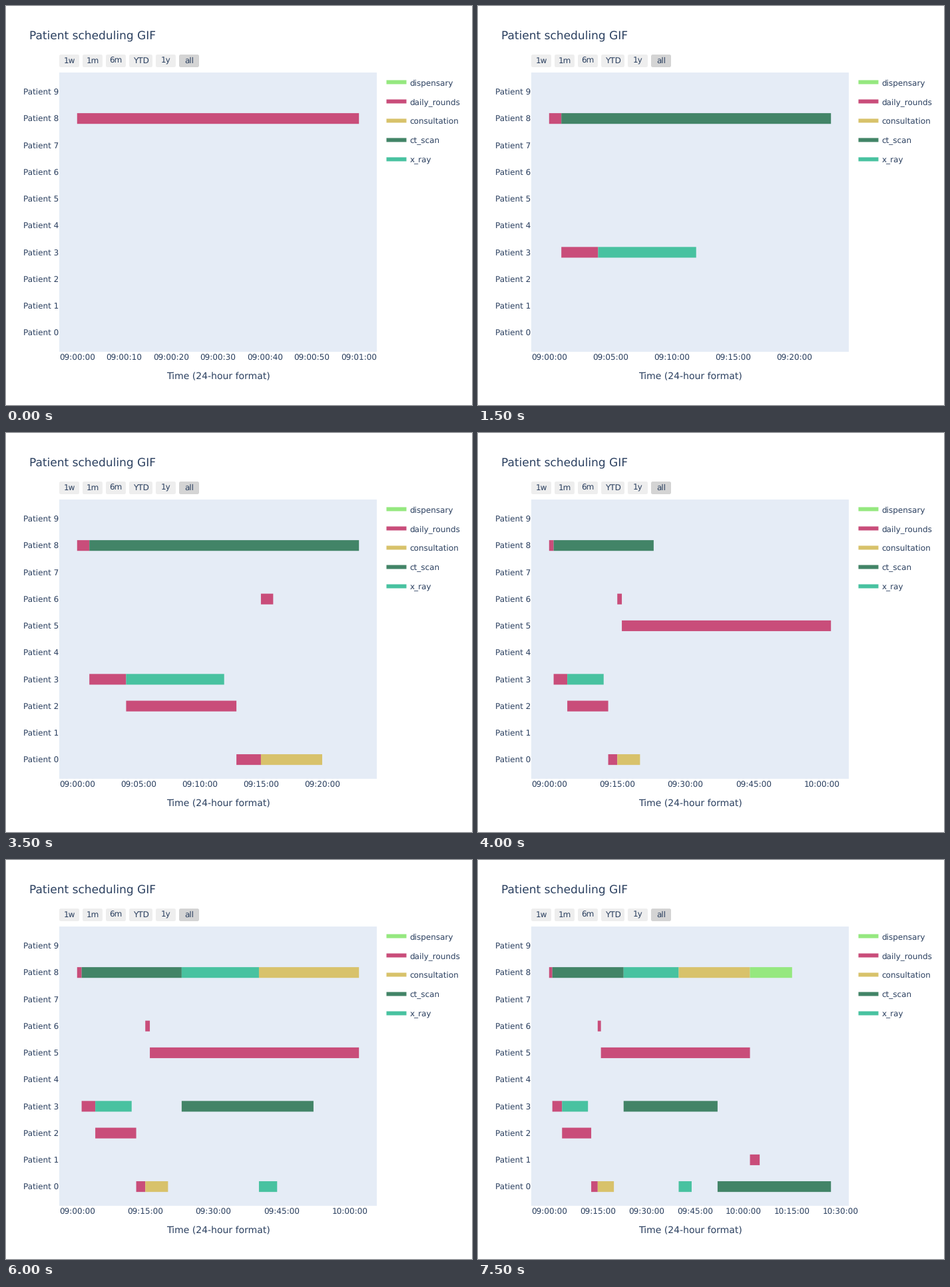
Animation of 700 by 600 pixels, one loop 8000 ms. Source, as a matplotlib script:

```python
import matplotlib.pyplot as plt
from matplotlib.animation import FuncAnimation
from matplotlib.patches import FancyBboxPatch, Rectangle

plt.rcParams.update({
    "font.family": "DejaVu Sans",
    "text.hinting": "none",
    "toolbar": "None",
})

W, H, DPI = 700, 600, 100
INK = "#2a3f5f"
LEFT, RIGHT, TOP, BOTTOM = 80, 557, 100, 520
X0, X1 = 106.8, 530.2          # pixel span of the scheduled time
Y0, ROW = 491.1, 40.24         # centre of the lowest row, row spacing

COLORS = {
    "dispensary": "#95e87f",
    "daily_rounds": "#c94d7a",
    "consultation": "#d8c26b",
    "ct_scan": "#428467",
    "x_ray": "#48c2a0",
}

# (patient, activity, start minute, end minute), one added per step
TASKS = [
    (8, "daily_rounds", 0, 1),
    (8, "ct_scan", 1, 23),
    (3, "daily_rounds", 1, 4),
    (3, "x_ray", 4, 12),
    (2, "daily_rounds", 4, 13),
    (0, "daily_rounds", 13, 15),
    (0, "consultation", 15, 20),
    (6, "daily_rounds", 15, 16),
    (5, "daily_rounds", 16, 62),
    (8, "x_ray", 23, 40),
    (3, "ct_scan", 23, 52),
    (0, "x_ray", 40, 44),
    (8, "consultation", 40, 62),
    (0, "ct_scan", 52, 87),
    (8, "dispensary", 62, 75),
    (1, "daily_rounds", 62, 65),
]

fig = plt.figure(figsize=(W / DPI, H / DPI), dpi=DPI, facecolor="white")
ax = fig.add_axes([0, 0, 1, 1])
ax.set_xlim(0, W)
ax.set_ylim(H, 0)
ax.axis("off")


def label(x, y, text, px=12, ha="left"):
    return ax.text(x, y, text, fontsize=px * 72 / DPI, color=INK,
                   ha=ha, va="baseline")


def box(x, y, w, h, color, z=1):
    return ax.add_patch(Rectangle((x, y), w, h, facecolor=color,
                                  linewidth=0, snap=False, zorder=z))


def row_y(patient):
    return Y0 - ROW * patient


def draw_static():
    label(35, 50, "Patient scheduling GIF", 17)
    label((LEFT + RIGHT) / 2, 561, "Time (24-hour format)", 14, "center")
    box(LEFT, TOP, RIGHT - LEFT, BOTTOM - TOP, "#e5ecf6", 0)

    x = LEFT
    for name in ("1w", "1m", "6m", "YTD", "1y", "all"):
        w = 35 if name == "YTD" else 30
        ax.add_patch(FancyBboxPatch(
            (x, 73), w, 19, boxstyle="round,pad=0,rounding_size=2.5",
            facecolor="#d4d4d4" if name == "all" else "#eeeeee", linewidth=0))
        label(x + w / 2, 86, name, ha="center")
        x += w + 5

    for p in range(10):
        label(79, round(row_y(p) + 4.2), f"Patient {p}", ha="right")

    for i, (name, color) in enumerate(COLORS.items()):
        y = 114.5 + 29 * i
        box(571.5, y - 3, 30, 6, color)
        label(606.5, round(y + 4.6), name)


def tick_step(span):
    """Tick distance in seconds for a span in minutes."""
    return 10 if span <= 1 else 300 if span <= 30 else 900


def clock(sec):
    return f"{9 + sec // 3600:02d}:{sec // 60 % 60:02d}:{sec % 60:02d}"


draw_static()
bars = [box(0, row_y(p) - 0.2 * ROW, 0, 0.4 * ROW, COLORS[kind], 2)
        for p, kind, _, _ in TASKS]
ticks = [label(0, 533, "", ha="center") for _ in range(7)]


def update(step):
    shown = TASKS[:step + 1]
    span = max(end for *_, end in shown)
    scale = (X1 - X0) / span

    for i, (bar, (_, _, start, end)) in enumerate(zip(bars, TASKS)):
        bar.set_visible(i <= step)
        bar.set_x(X0 + start * scale)
        bar.set_width((end - start) * scale)

    for i, tick in enumerate(ticks):
        sec = i * tick_step(span)
        x = X0 + sec / 60 * scale
        tick.set_visible(x <= RIGHT)
        tick.set_x(x)
        tick.set_text(clock(sec))
    return bars + ticks


anim = FuncAnimation(fig, update, frames=len(TASKS), interval=500,
                     init_func=lambda: update(0), repeat=True,
                     repeat_delay=0, blit=False)
plt.show()
```
